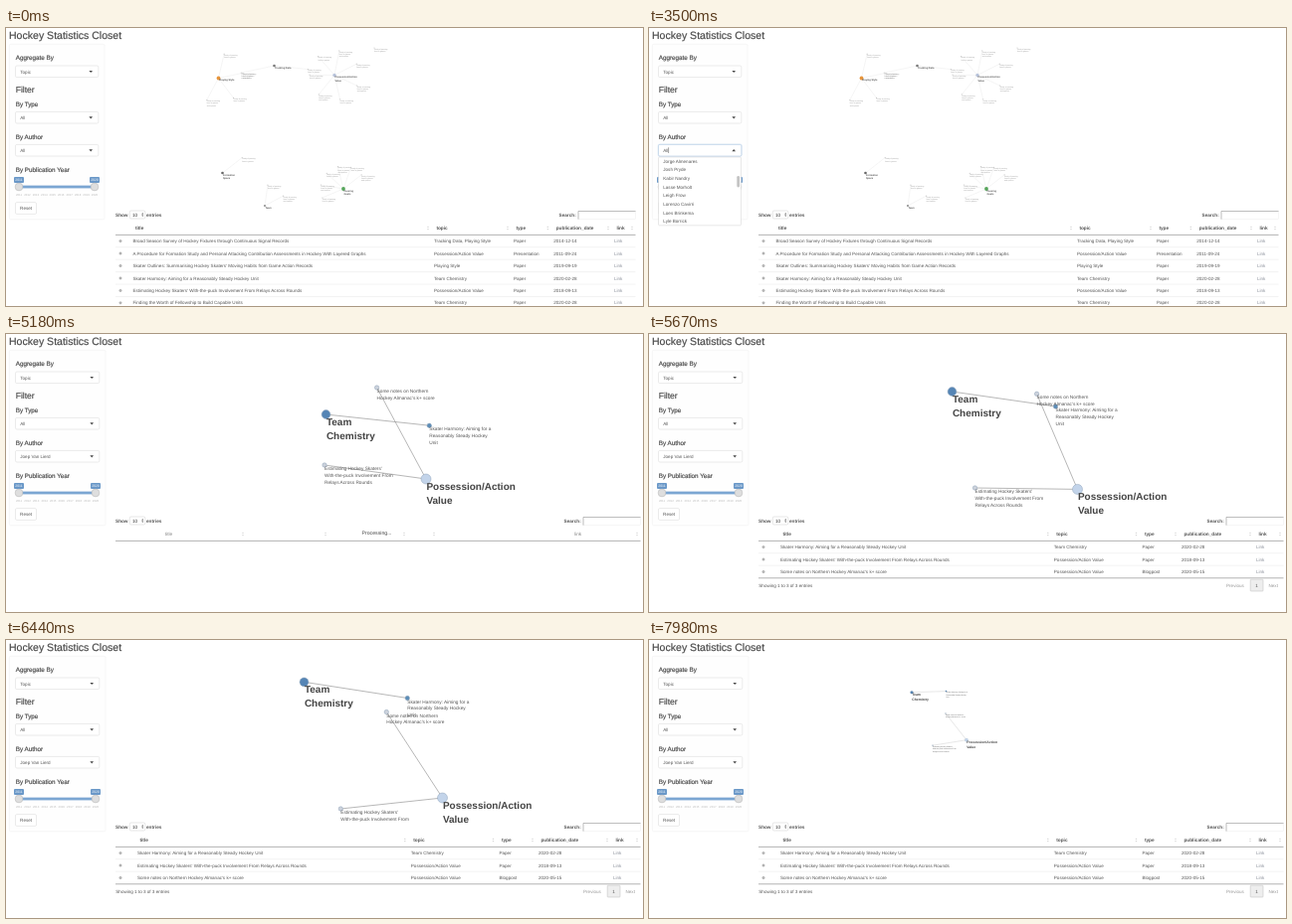
These frames come from a looping animation (640x280 px, 8000 ms). An HTML page:

```html
<!DOCTYPE html>
<html lang="en">
<head>
<meta charset="utf-8">
<title>Library dashboard</title>
<style>
html, body { margin: 0; width: 100%; height: 100%; overflow: hidden; background: #fff; }
svg { display: block; }
text { font-family: "Liberation Sans", Arial, sans-serif; text-rendering: geometricPrecision; white-space: pre; }
</style>
</head>
<body>
<svg id="stage" width="640" height="280" viewBox="0 0 640 280"></svg>
<script>
const LOOP = 8000, STEP = 70, BLINK = 525;
const OPEN = 1960, CLOSE = 4550, RELOAD = 4900, GRAPH = 5040, LOADED = 5670;
const INK = "#555", CHOSEN = "Joep Van Lierd";

const AUTHORS = ["All", "Adela Wroblinska", "Anton Holbrun", "Can Tekdemir", "Clément Malvot",
  "Fabien Gaudrel", "Haim Ben Orlitan", "Ivor Pellcroft", "Jens Wittlake", CHOSEN, "Jonah Tresk",
  "Jorge Almenares", "Josh Pryde", "Kabir Nandry", "Lasse Morholt", "Leigh Frow",
  "Lorenzo Cavirri", "Loes Brinkema", "Lyle Borrick", "Maud Ellering"];

const HARMONY = ["Skater Harmony: Aiming for a", "Reasonably Steady Hockey", "Unit"];
const PUCK = ["Estimating Hockey Skaters'", "With-the-puck Involvement From", "Relays Across Rounds"];
const NOTES = ["Some notes on Northern", "Hockey Almanac's k+ score"];
const VALUE = "Possession/Action Value";

const ROWS = [
  ["Broad Season Survey of Hockey Fixtures through Continuous Signal Records", "Tracking Data, Playing Style", "Paper", "2014-12-14"],
  ["A Procedure for Formation Study and Personal Attacking Contribution Assessments in Hockey With Layered Graphs", VALUE, "Presentation", "2011-09-24"],
  ["Skater Outlines: Summarising Hockey Skaters' Moving Habits from Game Action Records", "Playing Style", "Paper", "2019-09-19"],
  [HARMONY.join(" "), "Team Chemistry", "Paper", "2020-02-28"],
  [PUCK.join(" "), VALUE, "Paper", "2018-09-13"],
  ["Finding the Worth of Fellowship to Build Capable Units", "Team Chemistry", "Paper", "2020-02-28"]
];
const FOUND = [ROWS[3], ROWS[4], [NOTES.join(" "), VALUE, "Blogpost", "2020-05-15"]];

const text = (x, y, s, size = 4.57, fill = INK, extra = "") =>
  `<text x="${x}" y="${y}" font-size="${size}" fill="${fill}" ${extra}>${s}</text>`;
const bold = (x, y, s, size = 4.7, fill = INK) => text(x, y, s, size, fill, 'font-weight="700"');
const heading = (x, y, s, size) => text(x, y, s, size, "#4a4a4a", 'stroke="#4a4a4a" stroke-width=".18"');
const rect = (x, y, w, h, fill, stroke = "none", r = 0, sw = .5) =>
  `<rect x="${x}" y="${y}" width="${w}" height="${h}" rx="${r}" fill="${fill}" stroke="${stroke}" stroke-width="${sw}"/>`;
const line = (x1, y1, x2, y2, stroke, w = .5, extra = "") =>
  `<line x1="${x1}" y1="${y1}" x2="${x2}" y2="${y2}" stroke="${stroke}" stroke-width="${w}" ${extra}/>`;
const circle = (x, y, r, fill, extra = "") => `<circle cx="${x}" cy="${y}" r="${r}" fill="${fill}" ${extra}/>`;
const arrow = (x, y, w, h, fill) => `<path d="M${x - w / 2} ${y}h${w}l${-w / 2} ${h}z" fill="${fill}"/>`;
const updown = (x, y, fill) => arrow(x, y - .5, 1.9, -1.5, fill) + arrow(x, y + .5, 1.9, 1.5, fill);
const group = (id, body) => `<g id="${id}">${body}</g>`;

const select = (y, right, value) =>
  rect(9.5, y, right - 9.5, 11.6, "#fff", "#d6d6d6", 1.4) + text(14.3, y + 7.5, value) +
  arrow(right - 7.6, y + 4.9, 3.6, 2.1, "#444");

function sidebar(dx, author) {
  const right = 92.8 + dx, handle = 89 + dx;
  let out = rect(3.3, 16.3, 95.7 + dx, 176.5, "#fefefe", "#ececec", 1.4) +
    heading(9.7, 32, "Aggregate By", 6.3) + select(38, right, "Topic") +
    heading(9.7, 65.3, "Filter", 8.5) +
    heading(9.7, 78.8, "By Type", 6.3) + select(84.4, right, "All") +
    heading(9.7, 111.7, "By Author", 6.3) + select(117.4, right, author) +
    heading(9.7, 144.7, "By Publication Year", 6.3) +
    rect(13, 158.6, handle - 13, 2.8, "#7ba6d2");
  [[13, 2011], [handle, 2020]].forEach(([x, year]) => {
    out += rect(x - 5, 150, 10, 6, "#6a98c8", "none", 1) +
      text(x, 154.3, year, 3.4, "#fff", 'text-anchor="middle"') +
      circle(x, 160, 3.9, "#dedede", 'stroke="#b4b4b4" stroke-width=".5"');
  });
  for (let i = 0; i < 10; i++)
    out += text(13 + i * (handle - 13) / 9, 169, 2011 + i, 2.9, "#bbb", 'text-anchor="middle"');
  return out + rect(9.5, 175.6, 21, 11.8, "#fff", "#d6d6d6", 1.4) + text(14.1, 183.1, "Reset");
}

function controls(right) {
  const x = right - 57.5;
  return bold(110, 190, "Show") + rect(124.3, 184, 15.5, 8, "#fff", "#ccc", 1.4) +
    text(127, 189.8, "10", 4.7, "#333") + updown(137.2, 188, "#555") +
    bold(141, 190, "entries") + bold(x - 19.5, 190, "Search:") +
    rect(x, 184.5, 57.5, 8.2, "#fff", "#eee") +
    `<path d="M${x} 192.7V184.5H${right}" fill="none" stroke="#999" stroke-width=".6"/>`;
}

const sorter = x => updown(x, 201.5, "#d4d4d4");
const rule = (y, right) => line(110, y, right, y, "#666");

function table(rows, right, cols) {
  let out = rule(208.4, right);
  ["title", "topic", "type", "publication_date", "link"].forEach((name, i) => {
    out += bold(cols[i] + 2.4, 203.2, name, 4.75) + sorter(i < 4 ? cols[i + 1] - 6 : right - 3.5);
  });
  rows.forEach((row, r) => {
    const y = 216.2 + r * 12.45;
    if (r) out += line(110, y - 7.9, right, y - 7.9, "#e6e6e6");
    out += circle(115, y - 1.6, 1.2, "#bbb", 'stroke="#999" stroke-width=".4"');
    [...row, "Link"].forEach((cell, i) => out += text(cols[i], y, cell, 4.57, i < 4 ? INK : "#8a8f9a"));
  });
  return out;
}

// Hubs of the overview; leaves fan out from an angle in equal steps (degrees)
const HUBS = [
  { x: 213.5, y: 50.5, r: 1.9, color: "#e8963c", label: ["Playing Style"], leaves: 4, from: -77, step: 65, reach: 25 },
  { x: 269.5, y: 38, r: 1.3, color: "#777", label: ["Tracking Data"], leaves: 2, from: 6, step: 162, reach: 34 },
  { x: 330, y: 47.5, r: 1.7, color: "#b9c4dc", label: ["Possession/Action", "Value"], leaves: 7, from: -131, step: 52, reach: 25 },
  { x: 217.5, y: 146, r: 1.3, color: "#666", label: ["Formation", "Space"], leaves: 1, from: -38, step: 0, reach: 25 },
  { x: 260, y: 179, r: 1, color: "#888", label: ["Team"], leaves: 2, from: -82, step: 54, reach: 21 },
  { x: 339, y: 162, r: 1.9, color: "#55a55a", label: ["Passing", "Goals"], leaves: 6, from: 157, step: 33, reach: 23 }
];
const PHRASES = ["Study of passing", "lines in games", "and spaces"];
const leaf = (x, y, n) => circle(x, y, .6, "#ccc") +
  PHRASES.slice(0, n).map((s, i) => text(x, y + 1.7 + i * 2.2, s, 1.8, "#999")).join("");

function hub({ x, y, r, color, label, leaves, from, step, reach }) {
  let edges = "", notes = "";
  for (let i = 0; i < leaves; i++) {
    const a = (from + i * step) * Math.PI / 180;
    const lx = x + reach * Math.cos(a), ly = y + reach * Math.sin(a);
    edges += line(x, y, lx, ly, "#ddd", .3);
    notes += leaf(lx, ly, 2 + i % 2);
  }
  return edges + notes + circle(x, y, r, color) +
    label.map((s, i) => bold(x + .4, y + 2.6 + i * 3.8, s, 2.5)).join("");
}

// Each node passes three points while spreading, then moves to its small final place
const TURNS = [5180, 5670, 6440], SMALL = .345;
const NODES = [
  { r: 4.4, color: "#5585b5", hub: true, label: ["Team", "Chemistry"], path: [[321.5, 81], [304.5, 58], [299.5, 42.3]], end: [264, 52.7] },
  { r: 5, color: "#c3d4ea", hub: true, label: ["Possession/Action", "Value"], path: [[422, 146], [430.5, 156.4], [438.5, 159]], end: [319, 100.7] },
  { r: 2.2, color: "#5b8db8", label: HARMONY, path: [[425.3, 92.2], [408.5, 73], [403.3, 58.5]], end: [298.5, 51.6] },
  { r: 2.2, color: "#ccd2dc", label: NOTES, path: [[372.6, 54], [389.6, 60.3], [382.3, 72.5]], end: [298, 74] },
  { r: 2.2, color: "#ccd2dc", label: PUCK, path: [[320, 132], [327.5, 155], [336.3, 170]], end: [285, 106.2] }
];
const LINKS = [[0, 2], [1, 3], [1, 4]];

const progress = (t, a, b) => Math.min(1, Math.max(0, (t - a) / (b - a)));
const mix = (a, b, u) => a.map((v, i) => v + (b[i] - v) * u);

function along(path, t) {
  const i = t < TURNS[1] ? 0 : 1;
  const u = (t - TURNS[i]) / (TURNS[i + 1] - TURNS[i]);
  return mix(path[i], path[i + 1], Math.min(1, u));
}

function drawGraph(t) {
  const away = progress(t, 6510, 6860);
  const zoom = .64 + .36 * progress(t, 6860, 7700) ** 2;
  const left = 254 + 8 * progress(t, 7350, 7840);
  const k = 1 + (SMALL * zoom - 1) * away;
  const spots = NODES.map(({ path, end }) =>
    mix(along(path, t), [left + (end[0] - 262) * zoom, 112 + (end[1] - 112) * zoom], away));
  const links = LINKS.map(([a, b]) => line(...spots[a], ...spots[b], "#999", .7 * k));
  const nodes = NODES.map(({ r, color, hub, label }, n) => {
    const words = label.map((s, i) => hub
      ? bold(.4, 10.7 + i * 14, s, 10, "#444") : text(0, 5.1 + i * 6.8, s, 4.75));
    return `<g transform="translate(${spots[n]}) scale(${k})">` +
      circle(0, 0, r, color, 'stroke="#8fa3b8" stroke-width=".5"') + words.join("") + "</g>";
  });
  return links.join("") + nodes.join("");
}

const processing = text(163.5, 203, "title", 4.8, "#888", 'text-anchor="middle"') +
  text(571, 203, "link", 4.8, "#888") + [238, 321, 400, 430, 634].map(sorter).join("") +
  text(357.5, 202.3, "Processing...", 5.2, "#444") + rule(208.4, 637.5);

const pager = rule(245.8, 637.5) +
  text(110.3, 254.8, "Showing 1 to 3 of 3 entries") + text(580, 254.8, "Previous", 4.6, "#999") +
  rect(604.2, 247.2, 12.8, 11.8, "#eee", "#bbb", .7) + text(609.3, 254.8, "1", 4.6) +
  text(622.5, 254.8, "Next", 4.6, "#999");

const dropdown = rect(9.5, 117.4, 83.3, 11.6, "#fff", "#e6eff8", 1.4, 2) +
  rect(9.5, 117.4, 83.3, 11.6, "#fff", "#a3bfdc", 1.4) + text(14.3, 124.9, "All") +
  arrow(85.2, 124.2, 3.6, -2.1, "#444") + line(19.6, 120.3, 19.6, 126, "#444", .5, 'id="caret"') +
  rect(9.5, 130, 83, 68.8, "#fff", "#d0d0d0", 1) +
  '<svg x="10" y="130.6" width="82" height="67.6">' +
  group("list", AUTHORS.map((a, i) => text(4.3, 7 + i * 8.7, a)).join("")) + "</svg>" +
  '<rect id="thumb" x="88.3" width="2.8" height="11.5" rx="1.4" fill="#c4c4c4"/>';

const stage = document.getElementById("stage");
stage.innerHTML =
  '<clipPath id="plot"><rect x="110" y="14" width="530" height="170.5"/></clipPath>' +
  rect(0, 0, 640, 280, "#fff") + heading(3, 11.4, "Hockey Statistics Closet", 10.55) +
  group("all", sidebar(0, "All") + HUBS.map(hub).join("") + leaf(370, 20, 2) + controls(632.5) +
    table(ROWS, 632.5, [127.5, 430, 510, 550.3, 611])) +
  group("menu", dropdown) +
  group("picked", rect(10, 118, 40, 10, "#fff") + text(14.3, 124.9, CHOSEN)) +
  group("filtered", sidebar(1, CHOSEN) + controls(637.5)) +
  '<g clip-path="url(#plot)"><g id="graph"></g></g>' + group("busy", processing) +
  group("result", table(FOUND, 637.5, [132, 406.8, 495.5, 535, 610]) + pager);

const $ = id => document.getElementById(id);
const show = (id, from, to) => t => $(id).setAttribute("display", t >= from && t < to ? "inline" : "none");
const scenes = [show("all", 0, RELOAD), show("menu", OPEN, CLOSE), show("picked", CLOSE, RELOAD),
  show("filtered", RELOAD, LOOP), show("busy", RELOAD, LOADED), show("result", LOADED, LOOP)];

function render(now) {
  const t = Math.floor(now % LOOP / STEP) * STEP;
  scenes.forEach(scene => scene(t));
  const blink = Math.floor((t - OPEN) / BLINK) % 2;
  $("caret").setAttribute("opacity", blink ? 0 : 1);
  const scroll = t < 3640 ? 97.7 * progress(t, 2380, 2870) ** 1.5 : 80;
  $("list").setAttribute("transform", `translate(0 ${-scroll})`);
  $("thumb").setAttribute("y", 131.5 + scroll * .178);
  $("graph").innerHTML = t >= GRAPH ? drawGraph(t) : "";
}

const start = performance.now();
function tick() {
  render(performance.now() - start);
  requestAnimationFrame(tick);
}
tick();
</script>
</body>
</html>
```
